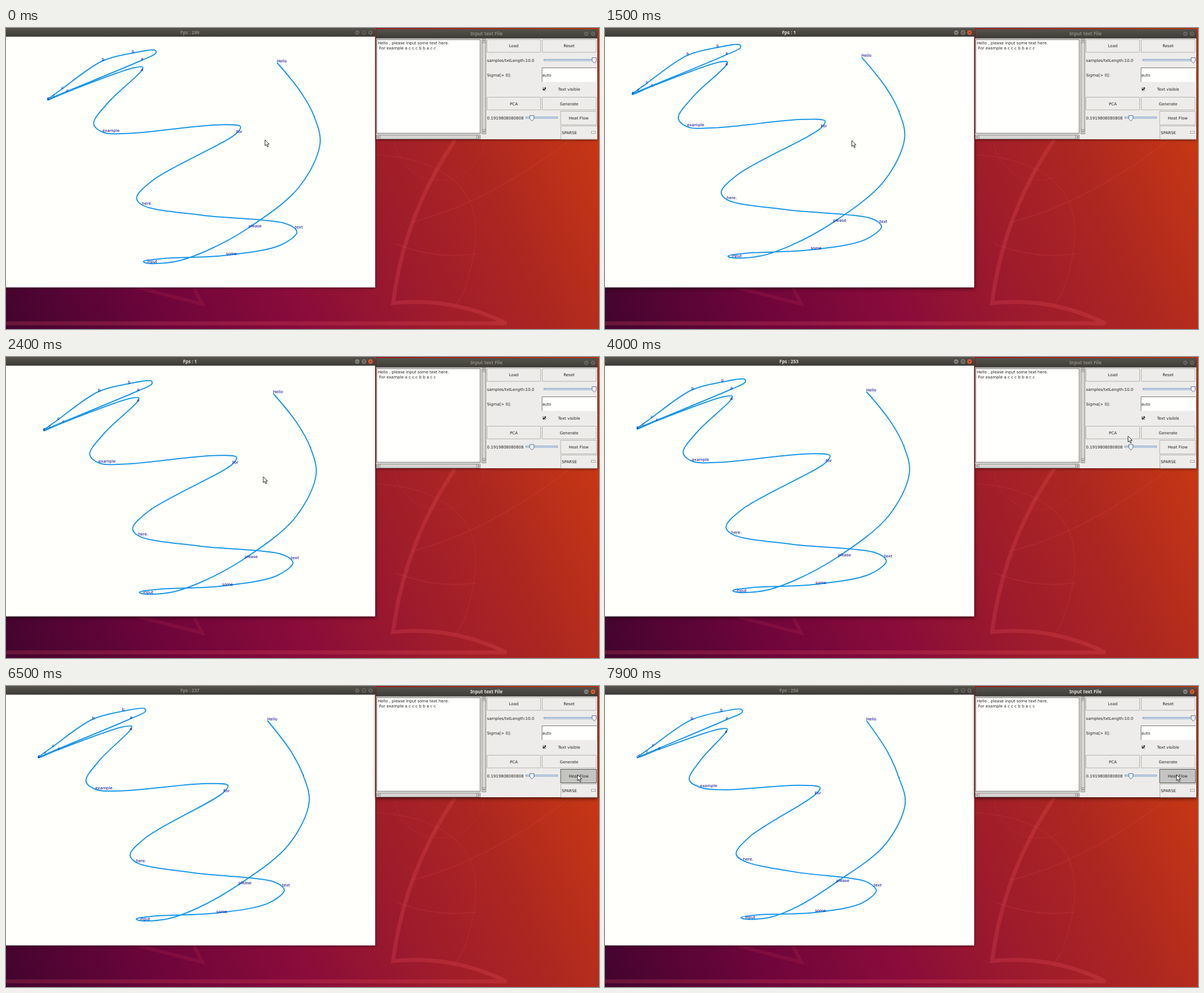
An HTML page that plays this animation: 1051x533 px, repeating every 8 s.

```html
<!DOCTYPE html>
<html lang="en">
<head>
<meta charset="utf-8">
<title>Text curve viewer</title>
<style>
html, body { margin: 0; width: 100%; height: 100%; overflow: hidden; background: #80103a; }
svg { display: block; }
text { font: 7.05px "DejaVu Sans", sans-serif; fill: #222; white-space: pre; }
.mid { text-anchor: middle; }
.title { font: 700 8.1px "Noto Sans", sans-serif; fill: #8b897f; text-anchor: middle; }
.focus .title { fill: #e4e0d6; }
.ctl circle { fill: #67655e; stroke: #35342f; stroke-width: .6; }
.focus .ctl circle { fill: #85837a; }
.focus .ctl circle.close { fill: #e95a30; }
.ctl path { fill: none; stroke: #35342f; stroke-width: .9; }
.window { filter: drop-shadow(0 1px 2px #0008); }
.window.focus { filter: drop-shadow(0 2px 3px #000a); }
.btn { fill: #edecea; stroke: #b4b2ae; }
.pressed { fill: #c4c4c2; stroke: #55554f; }
.well { fill: #fffffd; stroke: #8d8b87; }
.track { fill: #d7e3f1; stroke: #6b8cb5; stroke-width: .8; }
.thumb { fill: #f2f2f0; stroke: #4f6f9a; }
.art { fill: none; stroke: #f0566038; }
#words text { fill: #00008b; }
</style>
</head>
<body>
<svg width="1051" height="533" viewBox="0 0 1051 533">
  <defs>
    <linearGradient id="sky" gradientUnits="userSpaceOnUse" x1="0" y1="533" x2="1000" y2="90">
      <stop offset="0" stop-color="#42042e"/>
      <stop offset=".25" stop-color="#6f053b"/>
      <stop offset=".45" stop-color="#8a0c3a"/>
      <stop offset=".62" stop-color="#9c1a2d"/>
      <stop offset=".8" stop-color="#ab2622"/>
      <stop offset="1" stop-color="#c63714"/>
    </linearGradient>
    <linearGradient id="bar" x2="0" y2="1">
      <stop offset="0" stop-color="#55534b"/>
      <stop offset="1" stop-color="#3c3b36"/>
    </linearGradient>
    <clipPath id="view"><rect y="15.4" width="654" height="444"/></clipPath>
    <clipPath id="value"><rect x="852" y="150" width="65" height="18"/></clipPath>
    <path id="thumb" class="thumb" d="M-3.700 -3.500h7.500v6l-3.700 3.500-3.800-3.500z"/>
  </defs>

  <rect width="1051" height="533" fill="url(#sky)"/>
  <g class="art">
    <path stroke-width="7" d="M796 198Q706 330 686 487Q790 476 887 523H0"/>
    <path stroke-width="6" d="M235 460L348 489L333 460" opacity=".5"/>
    <g opacity=".6">
      <circle cx="768" cy="190" r="80"/>
      <path stroke-width="1.5" d="M655 224Q770 232 812 290T810 470L796 492"/>
      <path stroke-width="2" d="M718 344Q850 312 1000 198M690 382Q760 410 834 400"/>
    </g>
  </g>

  <g id="main" class="window">
    <rect width="654.3" height="459.4" fill="#fffffc"/>
    <rect width="654.3" height="15.4" fill="url(#bar)"/>
    <text id="fps" class="title" x="326" y="11"></text>
    <g class="ctl">
      <circle cx="622.5" cy="8" r="4.5"/><circle cx="634.5" cy="8" r="4.5"/>
      <circle class="close" cx="646" cy="8" r="4.5"/>
      <path d="M620.5 8.5h4M633 6.5h3v3h-3zM644.5 6.5l3 3m0-3l-3 3"/>
    </g>
  </g>
  <g clip-path="url(#view)">
    <path id="line" transform="translate(.5 .5)" fill="none" stroke="#1a97e6" stroke-width="2"/>
    <g id="words"></g>
  </g>

  <g id="panel" class="window">
    <rect x="656" y="2" width="392" height="195" fill="#edecea"/>
    <rect x="656" y="2" width="392" height="16.5" fill="url(#bar)"/>
    <text class="title" x="851.5" y="13">Input text File</text>
    <g class="ctl">
      <circle cx="1028.5" cy="10" r="4.5"/><circle class="close" cx="1040.5" cy="10" r="4.5"/>
      <path d="M1026.5 10.5h4M1039 8.5l3 3m0-3l-3 3"/>
    </g>
    <rect class="well" x="657" y="20.5" width="183.5" height="166" stroke-width="1.5"/>
    <text x="659" y="29">Hello , please input some text here.</text>
    <text x="659" y="37.5"> For example a c c c b b a c c</text>
    <g fill="#d5d4d1" stroke="#8d8b87">
      <path d="M843.5 19.5h7v168h-7zM656.5 189.5h184v7h-184z"/>
      <path fill="none" d="M843.5 26h7m-7 154h7M663 189.5v7M834 189.5v7"/>
      <path fill="none" stroke="#66645f" d="M845 24l2-3 2 3M845 182l2 3 2-3M661 191l-3 2 3 2M836 191l3 2-3 2"/>
    </g>
    <path class="btn" d="M852.5 20.5h95V43h-95zM950.5 20.5h95.5V43h-95.5zM852.5 122.5h95V145h-95zM950.5 122.5h95.5V145h-95.5z"/>
    <rect id="heat" class="btn" x="983" y="147.5" width="63.5" height="24"/>
    <path class="btn" d="M1048 173.5h-64.5V197H1048"/>
    <rect x="1037.5" y="183" width="7" height="3.5" fill="#f7f7f5" stroke="#a5a39f"/>
    <g class="mid">
      <text x="900" y="34">Load</text><text x="998" y="34">Reset</text>
      <text x="998" y="111">Text visible</text>
      <text x="900" y="136.5">PCA</text><text x="998" y="136.5">Generate</text>
      <text x="1015" y="162">Heat Flow</text>
    </g>
    <text x="852.5" y="59.5">samples/txtLength:10.0</text>
    <text x="852.5" y="85.5">Sigma[&gt; 0]:</text>
    <text x="852.5" y="162" clip-path="url(#value)">0.19198080808080</text>
    <text x="985" y="187.5">SPARSE</text>
    <rect x="950" y="70" width="97" height="25.5" fill="#fffffd"/>
    <path d="M950 95.5V70.5H1047" fill="none" stroke="#77756f"/>
    <text x="950.5" y="85.5">auto</text>
    <rect class="well" x="951.5" y="105.5" width="5" height="5"/>
    <path d="M952 107.5l1.5 2 3-4" fill="none" stroke="#111" stroke-width="1.5"/>
    <rect class="track" x="953.5" y="55.5" width="93" height="2.5"/>
    <rect class="track" x="921.5" y="157.5" width="56" height="2.5"/>
    <use href="#thumb" x="1042.500" y="56"/>
    <use href="#thumb" x="932" y="158.500"/>
  </g>

  <path id="cursor" d="M0 0V10.5L2.4 8.3 4.2 12.5 6 11.700 4.2 7.700H7.5Z" fill="#fff" stroke="#111" stroke-width=".9"/>
</svg>

<script>
const $ = id => document.getElementById(id);
const clamp = (v, lo, hi) => Math.min(hi, Math.max(lo, v));
const mix = (p, q, u) => [p[0] + (q[0] - p[0]) * u, p[1] + (q[1] - p[1]) * u];
const dist = (p, q) => Math.hypot(p[0] - q[0], p[1] - q[1]);
const LOOP = 8000, STEP = 100;

// Each word's place on the curve, then the bends before the next word
const legs = [
  ['Hello', [480, 61], [522, 113]],
  [',', [546, 157], [556, 205], [519, 281]],
  ['please', [430, 353], [355, 394], [300, 413]],
  ['input', [250, 416], [243, 413], [275, 408]],
  ['some', [390, 402], [486, 384], [515, 362]],
  ['text', [512, 355], [492, 345], [347, 331]],
  ['here.', [241, 313], [231, 300], [260, 269]],
  ['For', [408, 186], [415, 174], [376, 171], [218, 186]],
  ['example', [171, 184], [155, 169], [181, 131]],
  ['a', [239, 76], [242, 69], [226, 70]],
  ['c', [107, 113]],
  ['c', [73, 127]],
  ['c', [98, 108]],
  ['b', [170, 58]],
  ['b', [223, 44], [264, 39], [265, 44]],
  ['a', [239, 57]],
  ['c', [83, 122]],
  ['c', [73, 127]]];

// Pointer glides: from ms, to ms, x, y
const glides = [
  [400, 600, 464, 222], [600, 800, 463, 209],
  [800, 1200, 348, 222], [1200, 1700, 486, 187], [1700, 1900, 489, 187],
  [2000, 2300, 455, 216], [2300, 2400, 456, 212], [2600, 2900, 446, 209],
  [3100, 3800, 962, 124], [3800, 4000, 927, 140],
  [4100, 4800, 1009, 149], [4900, 5000, 1013, 157]];
const DRAG = [800, 2900];

const rates = [[0, 299], [900, 273], [1500, 1], [2900, 253], [6300, 237], [7200, 256]];

function pointer(t) {
  return glides.reduce((p, [from, to, x, y]) => {
    const u = clamp((t - from) / (to - from), 0, 1);
    return mix(p, [x, y], u * u * (3 - 2 * u));
  }, [459, 198]);
}
const grab = pointer(DRAG[0]);

// Heat flow pulls every word towards the middle of its neighbours
const spots = legs.map(leg => leg[1]);
const pulls = spots.map((p, i) => {
  if (!i || i === spots.length - 1) return [0, 0];
  const middle = mix(spots[i - 1], spots[i + 1], .5);
  return [(middle[0] - p[0]) * .095, (middle[1] - p[1]) * .095];
});
const nodes = legs.flatMap(([, ...pts], i) => pts.map((p, k) => {
  if (!k) return {p, pull: pulls[i], word: legs[i][0]};
  const before = dist(spots[i], p), after = dist(p, spots[i + 1]);
  return {p, pull: mix(pulls[i], pulls[i + 1], before / (before + after))};
}));

// Bezier handle at p on the way to q, coming from o (centripetal Catmull-Rom)
function handle(o, p, q) {
  const a = Math.sqrt(dist(o, p)), b = Math.sqrt(dist(p, q));
  if (!a) return p;
  return [0, 1].map(k =>
    (a * a * q[k] - b * b * o[k] + (2 * a * a + 3 * a * b + b * b) * p[k]) / (3 * a * (a + b)));
}

function spline(pts) {
  const at = i => pts[clamp(i, 0, pts.length - 1)];
  return 'M' + pts[0] + pts.slice(1).map((q, i) =>
    `C${handle(at(i - 1), pts[i], q)} ${handle(at(i + 2), q, pts[i])} ${q}`).join('');
}

for (const node of nodes.filter(n => n.word)) {
  node.label = document.createElementNS('http://www.w3.org/2000/svg', 'text');
  node.label.textContent = node.word;
  $('words').append(node.label);
}

function draw(now) {
  const t = Math.floor(now % LOOP / STEP) * STEP;
  const held = pointer(clamp(t, ...DRAG));
  const flow = clamp((t - 6200) / 1700, 0, 1) ** .7;

  const shape = nodes.map(({p, pull}) =>
    [0, 1].map(k => p[k] + held[k] - grab[k] + pull[k] * flow));
  $('line').setAttribute('d', spline(shape));
  nodes.forEach(({label}, i) => {
    label?.setAttribute('x', shape[i][0]);
    label?.setAttribute('y', shape[i][1]);
  });

  $('cursor').setAttribute('transform', `translate(${pointer(t)})`);
  $('fps').textContent = 'Fps : ' + rates.findLast(r => r[0] <= t)[1];
  $('main').classList.toggle('focus', t >= 900 && t < 5600);
  $('panel').classList.toggle('focus', t >= 5600);
  $('heat').classList.toggle('pressed', t >= 6100);
}

const start = performance.now();
(function tick() {
  draw(performance.now() - start);
  requestAnimationFrame(tick);
})();
</script>
</body>
</html>
```
